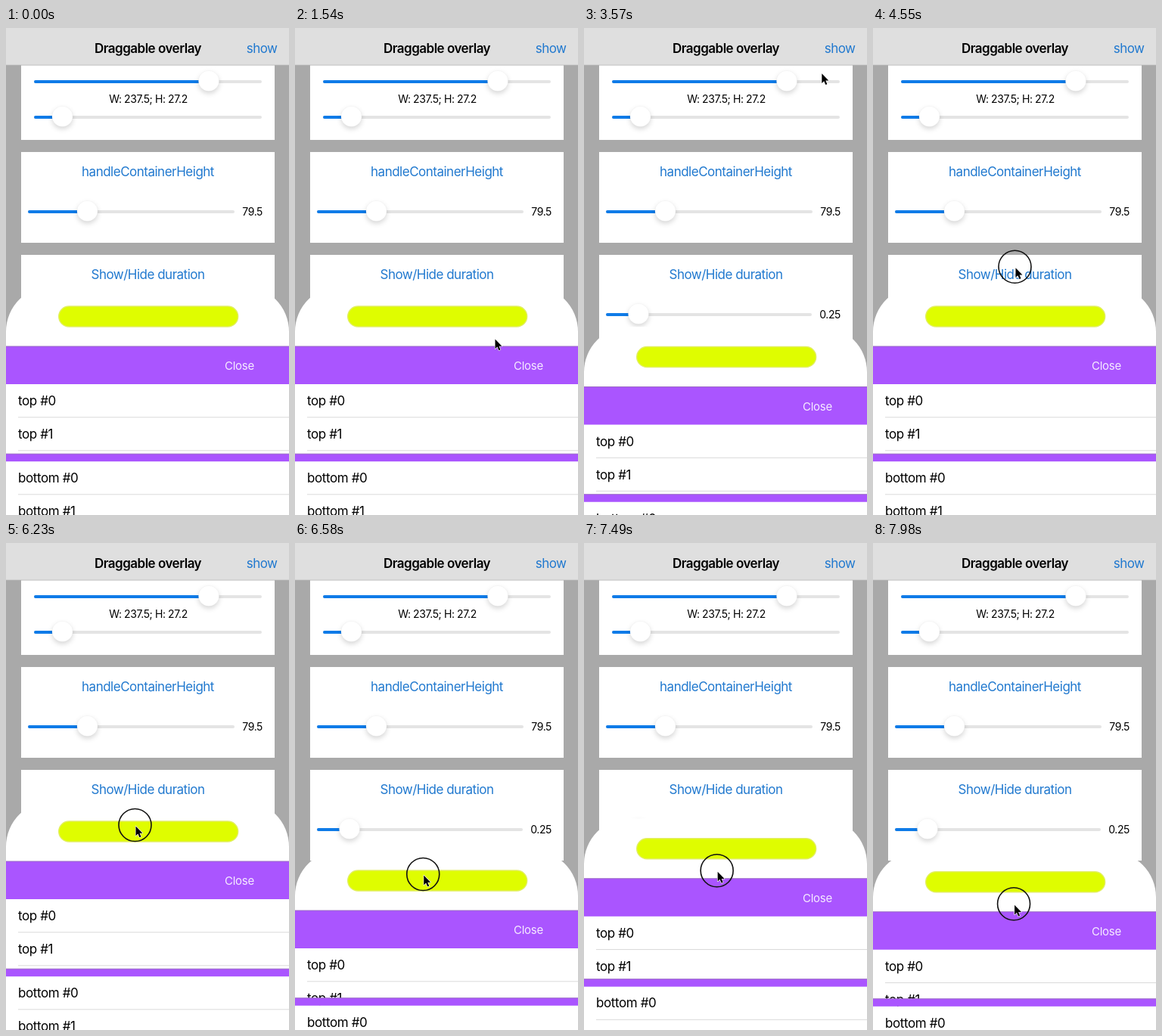
These frames come from a looping animation (374 px wide and 644 px high, 8 s). An HTML page:

```html
<!DOCTYPE html>
<html lang="en">
<head>
<meta charset="utf-8">
<title>Draggable overlay</title>
<style>
  html, body { margin: 0; width: 100%; height: 100%; overflow: hidden; background: #a9a9a9; }
  svg { display: block; width: 100vw; height: 100vh; }
  text { font: 17px Inter, Roboto, sans-serif; letter-spacing: -.5px; fill: #000; }
  .blue { fill: #2179cf; }
  .title { font-weight: 600; }
  .row { letter-spacing: -.4px; }
  .small { font-size: 14px; letter-spacing: -.4px; }
  .close { font-size: 15px; letter-spacing: -.2px; fill: #f6ecff; }
  .mid { text-anchor: middle; }
  .end { text-anchor: end; }
  .knob { fill: #fff; stroke: rgba(0,0,0,.05); stroke-width: .6; filter: drop-shadow(0 3px 3px rgba(0,0,0,.16)); }
  .pill { stroke: #e2ee62; stroke-width: 1.4; }
</style>
</head>
<body>
<svg id="stage" viewBox="0 0 374 644"></svg>
<script>
const LOOP = 8000, STEP = 70;

// Drawing helpers
const rect = (x, y, w, h, fill, r = 0, cls = "") =>
  `<rect x="${x}" y="${y}" width="${w}" height="${h}" rx="${r}" fill="${fill}" class="${cls}"/>`;
const label = (x, y, text, cls = "") => `<text x="${x}" y="${y}" class="${cls}">${text}</text>`;
const heading = (y, text) => label(187.5, y, text, "blue mid");
const knob = (x, y) => `<circle class="knob" cx="${x}" cy="${y}" r="13.6"/>`;
const card = (y, h) => rect(20, y, 335, h, "#fff");
const slider = (x, end, y, value) =>
  rect(x, y - 1, end - x, 4, "#e4e4e4", 2) + rect(x, y - 1, value - x, 4, "#0f7be8", 2) + knob(value, y);
const toggle = (y, text, on) => card(y - 30, 60) + label(28, y + 6, text, "blue") +
  rect(298, y - 15.5, 51, 31, on ? "#35c658" : "#e9e9e9", 15.5) + knob(on ? 333.5 : 313.5, y);
const list = (top, name) => [0, 1].map(n =>
  label(16, top + 44 * n + 28, `${name} #${n}`, "row") + rect(16, top + 44 * n + 43.3, 358, 1, "#dadada")).join("");
const purpleBar = (y, h) => rect(0, y, 374, h, "#aa55ff") + rect(0, y - .5, 374, 1, "#9a6cc4");

const page = rect(0, 0, 374, 644, "#a9a9a9") +
  card(40, 108) + slider(37, 338, 70, 268) + label(188, 98.5, "W: 237.5; H: 27.2", "small mid") + slider(37, 338, 117, 74.5) +
  card(164, 120) + heading(196, "handleContainerHeight") + slider(29, 302, 242, 107.5) + label(339, 247.5, "79.5", "small end") +
  card(300, 120) + heading(332, "Show/Hide duration") + slider(29, 301, 378, 72) + label(339, 383.5, "0.25", "small end") +
  ["isSnapToAnchorsEnabledSwitch", "isDragOffScreenToHideEnabled", "isBounceEnabled"]
    .map((text, n) => toggle(466 + 76 * n, text, n === 0)).join("");

const overlay = `<g id="overlay">
  <path d="M0 700V401.5A60 60 0 0 1 60 341.5H314A60 60 0 0 1 374 401.5V700Z" fill="#fff"/>
  ${rect(69.7, 368, 237, 27, "#dffd00", 13.5, "pill")}
  ${purpleBar(421, 50)}${label(308.5, 452, "Close", "close mid")}${list(471, "top")}
  <g id="bottomList">${rect(0, 573, 374, 140, "#fff")}${purpleBar(563.2, 10)}${list(573, "bottom")}</g></g>`;

const navBar = rect(0, 0, 374, 49, "#dfdfdf") + rect(0, 48.7, 374, .8, "#b4b4b4") +
  label(187.5, 33, "Draggable overlay", "title mid") + label(358.5, 33, "show", "blue end");

const pointer = `<g id="pointer">
  <circle id="press" cx="-.5" r="21.5" fill="none" stroke="#111" stroke-width="1.6"/>
  <path transform="translate(.5 1.5) scale(.87)" d="M0 0V14.6L3.3 11.5L5.7 17L8.1 16L5.8 10.6H10.3Z"
    stroke="#fff" stroke-width="1.4" stroke-linejoin="round" paint-order="stroke"/></g>`;

const $ = id => document.getElementById(id);
$("stage").innerHTML = page + overlay + navBar + pointer;

// Where the pointer goes between its free gestures
const CLOSE = [310, 449], SHOW = [342, 23], HANDLE = [171, 373], LOWERED = [169, 477], PAGE = [187, 220];
const stops = [
  [0, [390, 24]], [560, [-8, 640]], [700, [1, 628]], [980, [120, 350]],
  [1260, CLOSE], [1470, CLOSE], [1610, [218, 371]], [1750, [218, 371]], [1960, CLOSE], [2170, CLOSE],
  [2590, SHOW], [2800, [351, 83]], [3080, SHOW], [3430, SHOW], [4200, PAGE],
  [5950, [171, 356]], [6090, HANDLE], [6230, HANDLE], [6790, LOWERED], [7140, LOWERED],
  [7580, [178, 422]], [LOOP, [187, 480]]
];
const CLOSE_TAP = 1960, SHOW_TAP = 3150, WAVE = 4340, CIRCLE = 5110, DRAG_DOWN = 6230, DRAG_AGAIN = 7140;
const presses = [[CLOSE_TAP, 2130], [SHOW_TAP, 3390], [WAVE, 5040], [DRAG_DOWN, 6850], [DRAG_AGAIN, LOOP]];

const clamp = (v, min, max) => Math.min(max, Math.max(min, v));
const within = (t, from, to) => t >= from && t < to;

function pointerAt(t) {
  if (within(t, WAVE, CIRCLE)) return [188, 285 + 72 * Math.sin((t - 4491) / 840 * 2 * Math.PI)];
  if (within(t, CIRCLE, 5880)) {
    const turn = (t - CIRCLE) / 770 * 2 * Math.PI;
    return [191 + 154 * Math.sin(turn), 229 + 205 * Math.cos(turn)];
  }
  const next = stops.findIndex(([time]) => time > t);
  const [t0, from] = stops[next - 1], [t1, to] = stops[next];
  return from.map((v, axis) => v + (to[axis] - v) * (t - t0) / (t1 - t0));
}

// The overlay follows the pointer, but only between its two anchors
function dragAt(t, y) {
  if (t < DRAG_DOWN) return 0;
  return clamp(y - (t < DRAG_AGAIN ? HANDLE[1] : 410.5), 0, 70);
}

function ease(t, start) {
  const k = clamp((t - start) / 250, 0, 1);
  return k * k * (3 - 2 * k);
}

const move = (id, x, y) => $(id).setAttribute("transform", `translate(${x} ${y})`);

function render(t) {
  const [x, y] = pointerAt(t);
  const drag = dragAt(t, y);
  const slide = 302.5 * (ease(t, 2130) - ease(t, 3387));
  move("overlay", 0, drag + slide);
  move("bottomList", 0, -.407 * drag);
  move("pointer", x, y);
  $("press").setAttribute("visibility", presses.some(([from, to]) => within(t, from, to)) ? "visible" : "hidden");
}

const start = performance.now();
function tick() {
  const t = (performance.now() - start) % LOOP;
  render(Math.floor(t / STEP) * STEP);
  requestAnimationFrame(tick);
}
tick();
</script>
</body>
</html>
```
